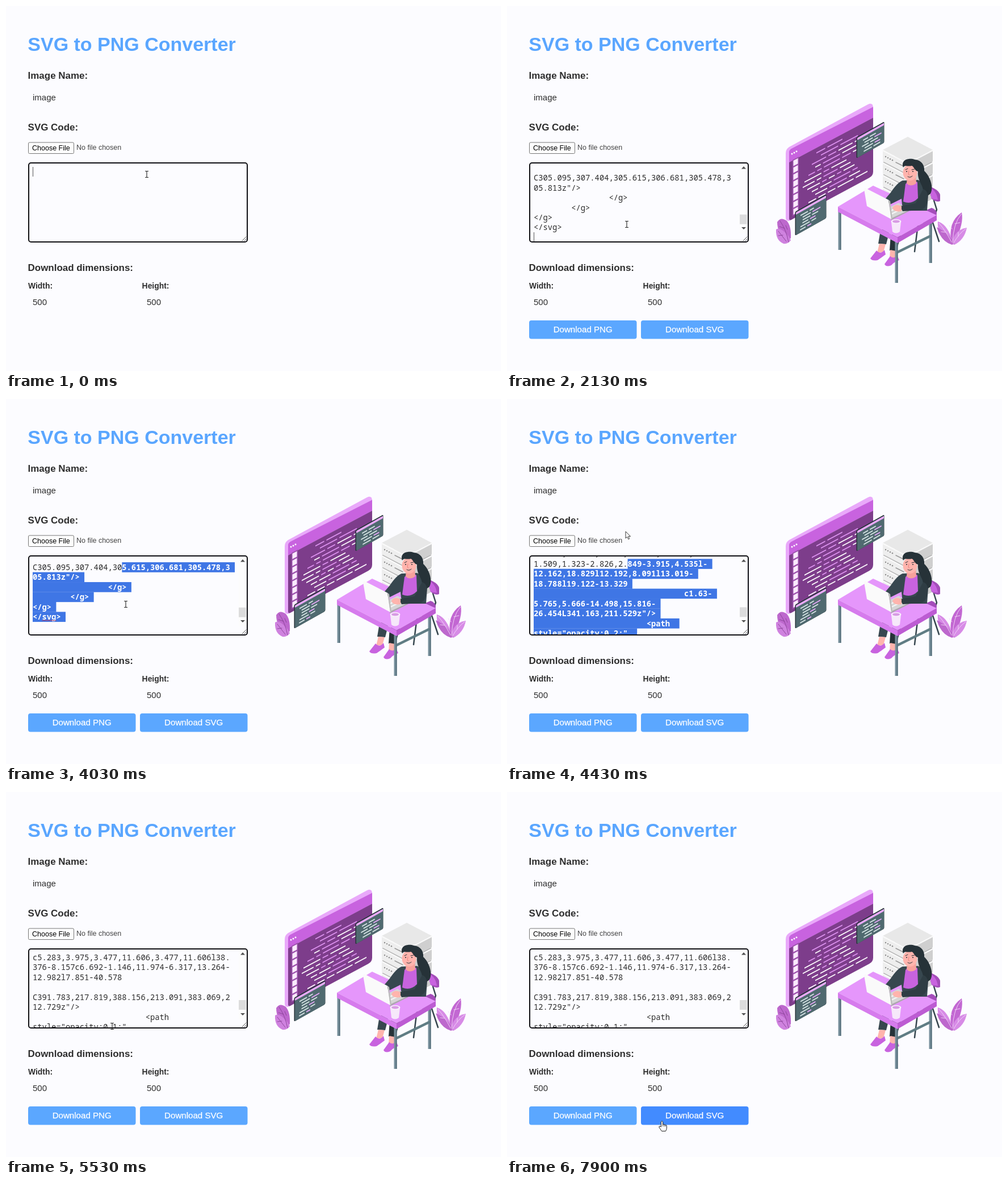
Animation, 872 px wide and 642 px high, one loop 8 s. Source, as an HTML page:

```html
<!DOCTYPE html>
<html lang="en">
<head>
<meta charset="utf-8">
<title>SVG to PNG Converter</title>
<style>
html, body { margin: 0; width: 100%; height: 100%; overflow: hidden; background: #fcfcff; }
svg { display: block; width: 872px; height: 642px; }
text { font-family: "Liberation Sans", Arial, sans-serif; white-space: pre; }
.code text { font: 13.8px "Noto Sans Mono", "DejaVu Sans Mono", monospace; fill: #2b2b2b; }
.code .sel { font-weight: bold; fill: #fff; }
.menu text { font: 10.8px "Open Sans", "Noto Sans", sans-serif; }
</style>
</head>
<body>
<svg id="stage" viewBox="0 0 872 642" xmlns="http://www.w3.org/2000/svg"></svg>
<script>
const LOOP = 8000, MENU_ON = 630, PASTE = 1870, DRAG = 3430, RELEASE = 5200;
const ROW = 17.45, CHAR = 8.28, LEFT = 47;

const label = (x, y, s, size, fill = '#2e2e2e', extra = '') =>
  `<text x="${x}" y="${y}" font-size="${size}" fill="${fill}" ${extra}>${s}</text>`;
const bold = (x, y, s, size, fill) => label(x, y, s, size, fill, 'font-weight="bold"');
const rect = (x, y, w, h, fill, r = 0, extra = '') =>
  `<rect x="${x}" y="${y}" width="${w}" height="${h}" rx="${r}" fill="${fill}" ${extra}/>`;
const shape = (d, fill) => `<path d="${d}" fill="${fill}"/>`;
const line = (d, color, w = 1) =>
  `<path d="${d}" fill="none" stroke="${color}" stroke-width="${w}" stroke-linecap="round" stroke-linejoin="round"/>`;

function seeded(seed) {
  return () => (seed = (seed * 16807) % 2147483647) / 2147483647;
}

// Text of the code box
function fillerLines(count, seed) {
  const rnd = seeded(seed), out = [];
  const num = () => (rnd() * 40).toFixed(3);
  for (let i = 0; i < count; i++) {
    if (i % 6 === 4) out.push(' '.repeat(24) + '&lt;path ');
    else if (i % 6 === 5) out.push('style="fill:#C35FDB;" ');
    else out.push([num(), num(), num(), num(), num(), num()].join(i % 2 ? ',' : '-').slice(0, 35 + rnd() * 7));
  }
  return out;
}
const pad = n => ' '.repeat(n);
const lines = [
  'c5.283,3.975,3.477,11.606,3.477,11.606l38.',
  '376-8.157c6.692-1.146,11.974-6.317,13.264-',
  '12.982l7.851-40.578', '',
  'C391.783,217.819,388.156,213.091,383.069,2',
  '12.729z"/>', pad(24) + '&lt;path ', 'style="opacity:0.1;" ',
  ...fillerLines(14, 77),
  '1.509,1.323-2.826,2.849-3.915,4.535l-',
  '12.162,18.829l12.192,8.091l13.019-',
  '18.788l19.122-13.329', pad(32) + 'c1.63-',
  '5.765,5.666-14.498,15.816-', '26.454L341.163,211.529z"/>',
  pad(24) + '&lt;path ', 'style="opacity:0.2;" ',
  ...fillerLines(12, 4242),
  '', 'C305.095,307.404,305.615,306.681,305.478,3', '05.813z"/>',
  pad(16) + '&lt;/g>', pad(8) + '&lt;/g>', '&lt;/g>', '&lt;/svg>', ''
].map(s => s.replace('&lt;', '<'));
const LAST = lines.length - 1;
const esc = s => s.replace(/</g, '&lt;');

// Illustration
function picture() {
  const rnd = seeded(991);
  const dark = '#263238', slate = '#37474f', skin = '#ffb4ad', mag = '#c863df', pale = '#e9a9fa';
  const dash = (u, v, w, c) => `<path d="M${u} ${v}h${w}" stroke="${c}" stroke-width="2"/>`;
  let s = '';

  s += shape('M491 259Q491 252 497 248L636 173Q644 169 645 178V290L497 378Q491 378 491 373Z', pale);
  let w = shape('M0 -18Q0 -21 3 -22L148 -19V0H0Z', mag);
  w += shape('M0 0H148V95Q148 102 141 102L4 103Q0 103 0 99Z', '#7d3d8b');
  w += rect(6, -1, 11, 99, '#9d52ac');
  for (let i = 0; i < 8; i++) w += rect(7.5, 1 + i * 12.2, 8, 9.5, '#fbeaff');
  for (let i = 0; i < 11; i++) {
    const v = 9 + i * 8;
    let u = 24 + [0, 8, 16, 22, 10, 3][i % 6] + (i < 2 ? 24 : 0);
    const end = 82 + rnd() * 56;
    while (u < end) {
      const len = 7 + rnd() * 24;
      w += dash(u, v, Math.min(len, 138 - u), i < 2 || rnd() < .3 ? '#dd92ef' : '#fff');
      u += len + 4;
    }
  }
  s += `<g transform="matrix(1 -.53 0 1 497 275)">${w}</g>`;
  for (let i = 0; i < 3; i++) s += `<circle cx="${502 + i * 4}" cy="${260 - i * 2.1}" r="1.5" fill="#fff"/>`;

  const panel = (x, y, wd, ht) => {
    let g = rect(-1.5, -2, wd + 2, ht + 2, dark, 2) + rect(0, 0, wd, ht, '#506a70', 2) + rect(0, 0, wd, 4, pale, 1);
    for (let v = 10; v < ht - 3; v += 5) {
      const u = 5 + rnd() * 9, a = 8 + rnd() * 10;
      g += dash(u, v, a, '#d9e7e7') + dash(u + a + 3, v, 6 + rnd() * 8, v % 2 ? pale : '#d9e7e7');
    }
    return `<g transform="matrix(1 -.56 0 1 ${x} ${y})">${g}</g>`;
  };
  s += panel(617, 232, 47, 35) + panel(509, 363, 53, 40);

  // Servers
  for (let i = 3; i >= 0; i--) {
    const y = 253 + i * 22;
    s += shape(`M662 ${y}L706 ${y + 23}V${y + 43}L662 ${y + 20}Z`, '#eeeeee');
    s += shape(`M706 ${y + 23}L750 ${y}V${y + 20}L706 ${y + 43}Z`, '#cfcfcf');
    s += shape(`M662 ${y}L706 ${y - 23}L750 ${y}L706 ${y + 23}Z`, i ? '#b5b5b5' : '#e8e8e8');
    s += line(`M662 ${y + 1}L706 ${y + 24}L750 ${y + 1}`, '#fafafa', 2);
    for (let k = 0; k < 4; k++)
      s += `<circle cx="${667 + k * 4}" cy="${y + 12 + k * 2.1}" r="1.2" fill="#8d8d8d"/>`;
    s += line(`M685 ${y + 22}L699 ${y + 29}`, '#9a9a9a', 1.5);
  }

  // Chair
  s += line('M724 384L718 432M748 375L761 414M752 342L757 358L752 373', slate, 2.5);
  s += shape('M742 317Q760 322 763 332V343Q756 346 748 339Z', '#a44dba');
  s += shape('M742 318Q757 324 759 341L748 339Z', mag);
  s += shape('M722 366L748 355Q760 360 756 370L733 382Z', '#a44dba');

  // Legs and shoes
  s += shape('M658 394L676 388L668 419L654 418Z', slate) + shape('M676 402L694 402L686 432L674 430Z', dark);
  s += shape('M656 418L667 419L663 433L652 434Z', skin) + shape('M675 429L686 431L684 445L674 445Z', skin);
  s += shape('M651 430Q658 438 665 429L667 437Q659 443 653 447Q643 449 640 444Z', mag);
  s += shape('M675 440Q682 446 687 438L691 447Q682 450 677 456Q668 460 665 454Z', mag);

  // Plants
  s += shape('M476 380Q482 370 493 378Q501 387 500 408L492 417Q476 399 476 380Z', '#bd68cd');
  s += shape('M474 393Q482 388 496 405L500 412Q495 419 487 418Q473 412 474 393Z', '#cf82df');
  s += line('M481 378Q492 394 496 415M478 396L492 414M480 388L489 391M478 404L486 403M491 386L494 393', '#8f479d');
  s += shape('M783 415Q776 380 801 363Q805 382 790 412Z', '#c267d2');
  s += shape('M781 416Q757 405 759 379Q776 384 785 414Z', '#d78be6');
  s += shape('M784 418Q787 394 810 390Q806 411 788 420Z', '#d78be6');
  s += shape('M784 420Q765 415 757 389Q779 399 788 418Z', '#bd68cd');
  s += line('M785 416Q786 383 800 366M783 415Q772 394 761 382M786 418Q796 400 808 392M784 392L779 386M789 383L798 381M772 398L765 397M795 405L795 398', '#f4d7fa', .9);

  // Desk
  const leg = (x, y, h) => rect(x, y, 5, h, '#78909c') + rect(x + 3, y, 2, h, '#546e7a');
  s += leg(583.5, 358, 71) + leg(743.5, 378, 74);
  s += line('M688 433L745 405', '#607d84', 4.5);
  s += leg(683.5, 412, 75);
  s += shape('M583 353L645 316L757 368L688 407Z', '#e596fb');
  s += shape('M583 353L688 407V417L583 362Z', '#d67bed');
  s += shape('M688 407L757 368V377L688 417Z', '#bd5cd3');

  // Woman
  s += shape('M697 307Q688 310 676 328L664 342Q664 350 675 349L695 339L697 360L740 360L742 332Q740 312 724 306Z', slate);
  s += shape('M702 313Q712 303 723 310L724 338Q712 350 698 344Z', mag);
  s += shape('M705 300L720 296L721 312Q711 319 704 312Z', '#f7a19c');
  s += `<ellipse cx="710" cy="293" rx="12.5" ry="14" fill="${skin}"/>`;
  s += shape('M698 284C693 269 710 267 718 270C731 271 736 281 735 290C746 300 752 320 746 330C738 338 731 331 733 323C731 312 723 307 724 291C719 291 716 281 713 281C706 283 701 279 698 284Z', dark);
  s += line('M702 288L706 286M713 288L718 287M706 300Q710 303 714 299', dark, 1);
  s += `<circle cx="704" cy="291" r="1" fill="${dark}"/><circle cx="715" cy="291" r="1" fill="${dark}"/>`;
  s += line('M708 290L707 296L709 297', '#e8827e');

  // Laptop and cup
  s += shape('M676 374L708 359L690 346L664 359Z', '#d6d6d6');
  s += shape('M676 374L708 359V361L676 377Z', '#aaaaaa');
  s += line('M673 362L690 353M677 366L695 357', '#f5f5f5', 2);
  s += shape('M629 322L631 320L672 341L677 375L634 352Z', '#fafafa');
  s += shape('M672 341L675 343L679 374L677 376Z', '#bdbdbd');
  s += shape('M733 322Q743 325 741 340Q739 357 728 359L697 361L692 352L720 347Z', '#2f3d44');
  s += shape('M695 352Q684 347 679 355Q681 363 695 361Z', skin);
  s += shape('M677 380L694 380L692 397Q685 402 679 397Z', '#f6e8fa');
  s += `<ellipse cx="685.5" cy="379" rx="9" ry="4" fill="#f9f0fc"/><ellipse cx="685.5" cy="379" rx="6.5" ry="2.4" fill="#d89be4"/>`;
  return s;
}

// Context menu
function contextMenu() {
  const items = [
    [317, 'Emoji', 'Win+Period', 1], [359, 'Undo', 'Ctrl+Z'], [385.5, 'Redo', 'Ctrl+Shift+Z'],
    [427.5, 'Cut', 'Ctrl+X'], [454, 'Copy', 'Ctrl+C'], [480.5, 'Paste', 'Ctrl+V', 1],
    [507, 'Paste as plain text', 'Ctrl+Shift+V', 1], [533, 'Select all', 'Ctrl+A'],
    [559.5, 'Open in reading mode', '', 1], [602, 'Spell check', '', 1]
  ];
  let s = rect(247.5, 295.5, 318.5, 340.5, '#1f1f26', 8, 'filter="url(#shadow)"');
  for (const y of [337, 405.5, 580.5]) s += rect(247.5, y, 318.5, 1, '#494755');
  s += '<g clip-path="url(#menuClip)">';
  for (const [y, name, keys, on] of items) {
    const c = on ? '#f4f4f6' : '#85858b';
    s += label(292.5, y + 4, name, 11, c) + label(546.5, y + 4, keys, 11, c, 'text-anchor="end"');
  }
  s += line('M538 597.5L541.5 600.8L538 604', '#eee', 1.1) + '</g>';
  return s + shape('M403.5 613.5H409.5L406.5 616.8Z', '#f4f4f6');
}

const button = (id, x, s) =>
  rect(x, 553, 189.5, 32.5, '#5ba7ff', 4, `id="${id}"`) +
  label(x + 94.7, 574, s, 15.1, '#fff', 'text-anchor="middle" stroke="#fff" stroke-width=".25"');

const stage = document.getElementById('stage');
stage.innerHTML = `
<defs>
  <clipPath id="boxClip"><rect x="41" y="277" width="368" height="137"/></clipPath>
  <clipPath id="menuClip"><rect x="248" y="296" width="318" height="307"/></clipPath>
  <filter id="shadow" x="-10%" y="-10%" width="120%" height="120%">
    <feDropShadow dx="0" dy="3" stdDeviation="3" flood-opacity=".3"/>
  </filter>
</defs>
${rect(0, 0, 872, 642, '#fcfcff')}
${bold(38.3, 79, 'SVG to PNG Converter', 34, '#5aa6ff')}
${bold(38.6, 128, 'Image Name:', 16.95)}
${label(47, 166, 'image', 15)}
${bold(38.6, 219, 'SVG Code:', 16.95)}
${rect(39.5, 240, 80, 19.5, '#fdfdfd', 2, 'stroke="#767676"')}
${label(46, 254, 'Choose File', 12.5, '#000')}
${label(124, 253, 'No file chosen', 12.5, '#444')}
${bold(38.6, 466, 'Download dimensions:', 16.95)}
${bold(39, 497, 'Width:', 13.9)}
${bold(239.6, 497, 'Height:', 13.9)}
${label(47, 526, '500', 15)}
${label(248, 526, '500', 15)}
<g id="result">${picture()}${button('png', 39, 'Download PNG')}${button('svg', 236, 'Download SVG')}</g>
<g id="code" class="code" clip-path="url(#boxClip)"></g>
<path id="caret" d="M47.5 283V300" stroke="#555"/>
<g id="bar">
  ${rect(410, 278, 14, 122, '#fcfcfc')}
  ${shape('M413 286.5H421L417 282Z', '#505050')}${shape('M413 389H421L417 393Z', '#505050')}
  <rect id="thumb" x="410" width="13" height="17" fill="#dcdcdc"/>
</g>
${rect(40, 276, 385, 139, 'none', 4, 'stroke="#101014" stroke-width="2"')}
${line('M416 413L423 406M420 413L423 410', '#555')}
<g id="menu" class="menu">${contextMenu()}</g>
<g id="ibeam">${line('M-2.5 -5.5H-.8L0 -5L.8 -5.5H2.5M0 -5V5M-2.5 5.5H-.8L0 5L.8 5.5H2.5', '#222', 1.1)}</g>
<g id="arrow"><path d="M0 0V12L2.8 9.4L4.8 13.7L6.7 12.8L4.8 8.7H8.5Z" fill="#fff" stroke="#222" stroke-width=".9"/></g>
<g id="hand"><path d="M-1.5 10V1Q0 -1.5 1.5 1V6Q3 4.6 4 6.5Q5.5 5.3 6.3 7Q8.3 6.2 8.3 8.5V12Q8 15 6.5 17.5H-.5Q-3 13.5 -5 11Q-5.6 8 -3 9Z" fill="#fff" stroke="#222"/><path d="M1.5 6V9M4 6.5V9.5M6.3 7V9.5" stroke="#222" stroke-width=".8"/></g>`;

const el = id => document.getElementById(id);
const show = (id, on) => el(id).setAttribute('display', on ? 'inline' : 'none');

const ease = k => k * k * (3 - 2 * k);
function track(keys, t, curve = k => k) {
  let i = 0;
  while (i < keys.length - 1 && t >= keys[i + 1][0]) i++;
  const a = keys[i], b = keys[i + 1] || a;
  const k = a === b ? 0 : curve(Math.max(0, (t - a[0]) / (b[0] - a[0])));
  return a.slice(1).map((v, j) => v + (b[j + 1] - v) * k);
}

const pointerKeys = [
  [0, 248, 296], [870, 248, 296], [1000, 256, 314], [1650, 310, 482], [1870, 310, 482],
  [2130, 211, 384], [2700, 211, 384], [3000, 150, 407], [3400, 150, 407], [4030, 211, 361],
  [4430, 209, 233], [5200, 205, 233], [5530, 187, 412], [6000, 180, 440], [6430, 180, 440],
  [7000, 134, 573], [7570, 134, 573], [7900, 273, 579]
];
const scrollKeys = [
  [0, 739], [DRAG, 739], [3650, 745.4], [4090, 745.4], [4430, 385.9], [4800, 0]
];
const dragKeys = [[DRAG, LAST], [4000, LAST - 6], [4090, LAST - 6], [4200, 0]];

function codeRows(t, scroll) {
  const selecting = t >= DRAG && t < RELEASE;
  const head = selecting
    ? Math.max(Math.round(scroll / ROW), Math.round(track(dragKeys, t)[0])) : LAST + 1;
  const first = Math.max(0, Math.floor(scroll / ROW) - 1);
  let out = '';
  for (let i = first; i <= Math.min(LAST, first + 10); i++) {
    const s = lines[i], y = 291 + ROW * i - scroll;
    let from = s.length;
    if (i >= head && i < LAST) {
      from = i > head ? 0 : Math.min(s.length, head > 30 ? 19 : 20);
      out += rect(LEFT + from * CHAR, y - 8.8, (s.length - from + 1) * CHAR, ROW + .2, '#3f76e5');
    }
    out += `<text x="${LEFT}" y="${y + 4.8}">${esc(s.slice(0, from))}</text>`;
    out += `<text class="sel" x="${LEFT + from * CHAR}" y="${y + 4.8}">${esc(s.slice(from))}</text>`;
    if (i === LAST - 1 && selecting)
      out += line(`M64 ${y + 7}` + 'l2 -1.5l2 1.5'.repeat(6), '#d33a4a', .9);
  }
  return out;
}

function render(t) {
  const pasted = t >= PASTE, menu = t >= MENU_ON && t < PASTE;
  const [scroll] = track(scrollKeys, t);
  const [x, y] = track(pointerKeys, t, ease);

  show('menu', menu);
  show('result', pasted);
  show('bar', pasted);
  el('code').innerHTML = pasted ? codeRows(t, scroll) : '';
  el('thumb').setAttribute('y', 366 + scroll / 1000);

  const blink = (pasted ? t - PASTE : t) % 1000 < 500;
  show('caret', blink && !menu && t < DRAG);
  el('caret').setAttribute('transform', `translate(0 ${pasted ? 115 : 0})`);

  const inRow = y > 553 && y < 586;
  const overPng = inRow && x > 39 && x < 229, overSvg = inRow && x > 236 && x < 426;
  el('png').setAttribute('fill', pasted && overPng ? '#428bff' : '#5ba7ff');
  el('svg').setAttribute('fill', pasted && overSvg ? '#428bff' : '#5ba7ff');

  const inBox = x > 39 && x < 426 && y > 275 && y < 416;
  const kind = menu ? 'arrow' : inBox ? 'ibeam' : pasted && (overPng || overSvg) ? 'hand' : 'arrow';
  for (const id of ['ibeam', 'arrow', 'hand']) show(id, id === kind);
  el(kind).setAttribute('transform', `translate(${x} ${y})`);
}

const start = performance.now();
function tick() {
  render((performance.now() - start) % LOOP);
  requestAnimationFrame(tick);
}
tick();
</script>
</body>
</html>
```
